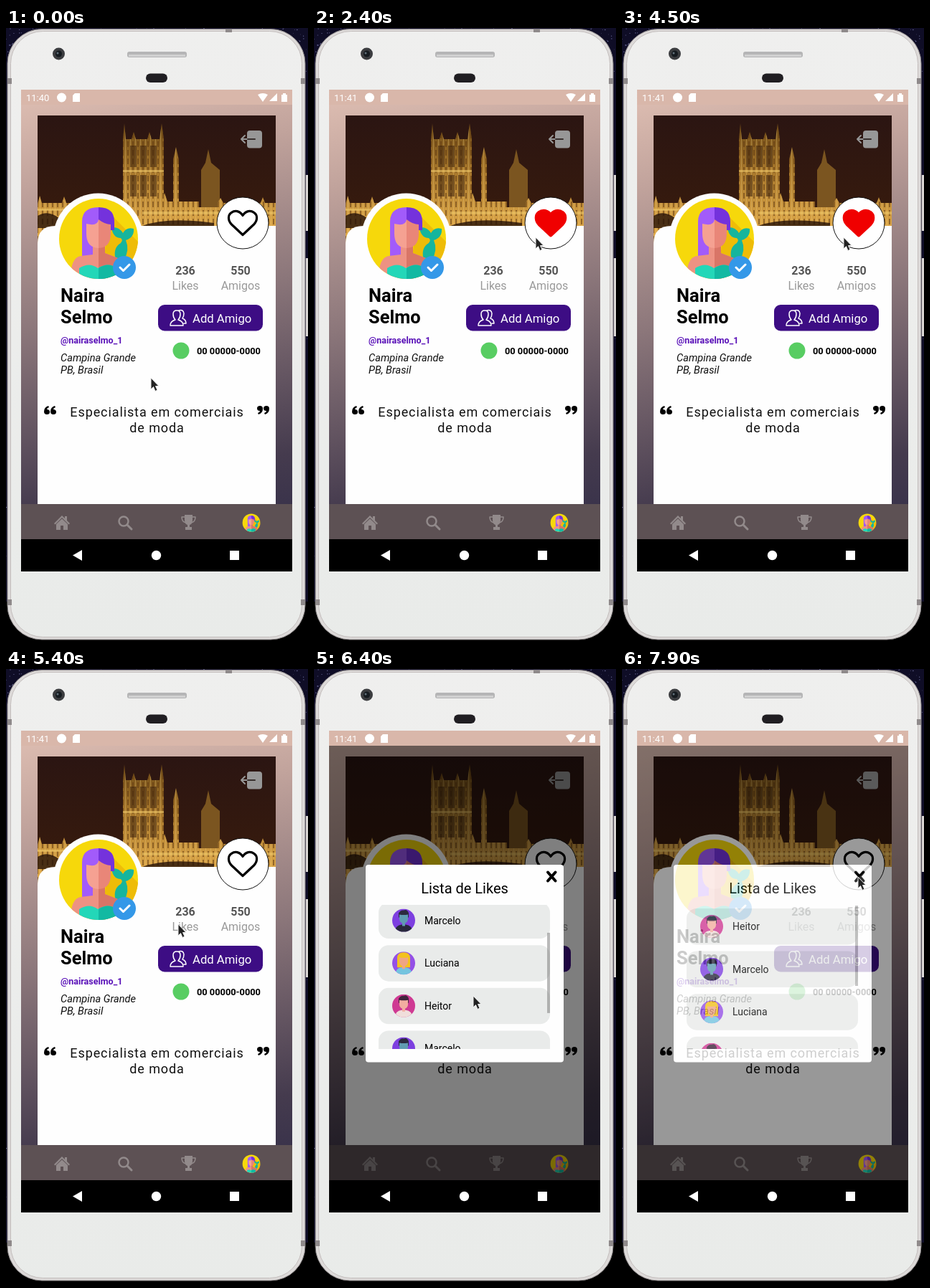
These frames come from a looping animation (421 by 855 pixels, 8 s). An HTML page:

```html
<!DOCTYPE html>
<html lang="pt">
<head>
<meta charset="utf-8">
<title>Perfil</title>
<style>
  html, body { margin: 0; width: 100%; height: 100%; overflow: hidden; background: #0c0a1a; }
  svg { display: block; font-family: Roboto, sans-serif; }
  .mid { text-anchor: middle; }
  .bold { font-weight: 700; }
  .icon { fill: #928a8b; }
  .line { fill: none; stroke-linecap: round; stroke-linejoin: round; }
</style>
</head>
<body>
<svg id="stage" width="100%" height="100%" viewBox="0 0 421 855">
  <defs>
    <linearGradient id="shell" x2="0" y2="1">
      <stop offset="0" stop-color="#efefee"/><stop offset="1" stop-color="#e9ebe9"/>
    </linearGradient>
    <linearGradient id="wall" x2=".12" y2="1">
      <stop offset="0" stop-color="#dfbfb3"/><stop offset=".2" stop-color="#c1a39c"/>
      <stop offset=".5" stop-color="#8b767a"/><stop offset=".86" stop-color="#453b4e"/>
      <stop offset="1" stop-color="#37314a"/>
    </linearGradient>
    <linearGradient id="sky" x2="0" y2="1">
      <stop offset="0" stop-color="#2b1512"/><stop offset="1" stop-color="#3a1c0c"/>
    </linearGradient>
    <linearGradient id="glow" gradientUnits="userSpaceOnUse" x1="0" y1="130" x2="0" y2="276">
      <stop offset="0" stop-color="#6b4816"/><stop offset=".45" stop-color="#a5752a"/><stop offset="1" stop-color="#dca648"/>
    </linearGradient>
    <pattern id="stone" width="7" height="12" patternUnits="userSpaceOnUse">
      <path fill="#5a350f" opacity=".55" d="M1 2h2v8H1z"/><path fill="#f0cf7d" opacity=".35" d="M5 0h1v12H5z"/>
    </pattern>
    <clipPath id="card"><path d="M44 122h332v542H44z"/></clipPath>
    <clipPath id="round"><ellipse cx="129" cy="294" rx="55" ry="56"/></clipPath>
    <clipPath id="disc"><circle cx="35" cy="25" r="16"/></clipPath>
    <path id="heart" d="M330 288.500L314.500 274C309 268.500 309.500 261 313.500 258C319 253.500 326 255 330 261.500C334 255 341 253.500 346.500 258C350.500 261 351 268.500 345.500 274Z"/>
    <path id="palace" d="M163 250V157l2-24 2 22h8l3-10 3 10h16l3-10 3 10h11l3-22 3 22v95zM233 262v-78l4-18 4 18v78zM44 246l3-12 3 10h28l3-9 3 9h32l3-9 3 9h41v6h54v-8l4-12 4 12h44v8h26v-6l4-7 4 7h22l3-8 3 8h24l3-8 3 8h22v57H44z"/>
    <g id="quote"><path d="M0 8Q0 2 6 0L7 2Q4 3 4 5Q8 5 8 8.500Q8 12 4 12Q0 12 0 8M9 8Q9 2 15 0L16 2Q13 3 13 5Q17 5 17 8.500Q17 12 13 12Q9 12 9 8"/></g>
    <g id="woman" clip-path="url(#round)">
      <path fill="#f6d80b" d="M70 235h120v120H70z"/>
      <path fill="#eebc08" d="M146 260L190 304v56h-60z"/>
      <path fill="#16b59d" d="M153 324Q149 309 157 302Q165 297 160 293Q149 293 147 278Q158 277 163 286Q168 277 178 280Q179 292 167 296Q173 310 164 324Z"/>
      <path fill="#a25bfa" d="M106 318V270Q106 250 129 250V318Z"/>
      <path fill="#7432dc" d="M129 250Q151 250 151 270V282H129Z"/>
      <path fill="#ed9283" d="M90 350Q90 320 104 318L121 316V298H138V314L151 319Q168 324 168 350Z"/>
      <path fill="#d97567" d="M129 298h9v16l13 5q17 5 17 31h-39z"/>
      <path fill="#f5a192" d="M112 273Q128 277 129 267V307Q112 306 112 287Z"/>
      <path fill="#e98678" d="M129 267Q138 274 146 274V287Q146 306 129 307Z"/>
      <path fill="#23d7b8" d="M102 350V335Q116 326 128 335Q142 326 155 335V352Z"/>
      <path fill="#12b9a2" d="M129 335q13-9 26 0v17h-26z"/>
    </g>
  </defs>

  <path fill="#0f0d26" d="M0 0h421v855H0z"/>
  <g id="stars"></g>
  <path fill="#000" d="M0 800h421v55H0z"/>

  <!-- phone -->
  <path fill="#d9d5d3" d="M418 205h3v78h-3zM418 321h3v109h-3z"/>
  <rect x="2" y="1.500" width="415" height="851.500" rx="48" fill="#dddad9" stroke="#8f8a8b"/>
  <rect x="6.500" y="4.500" width="406" height="845" rx="45" fill="url(#shell)" stroke="#c3bdbc"/>
  <path fill="#8f8a8b" d="M306 1h9v5h-9zM2 70h6v8H2zM411 70h6v8h-6zM2 797h6v8H2zM411 797h6v8h-6z"/>
  <circle cx="73.500" cy="36" r="8.500" fill="#3c3d40"/><circle cx="73.500" cy="36" r="4.500" fill="#161b20"/>
  <circle cx="72" cy="35" r="1.500" fill="#617079"/>
  <rect x="169" y="33" width="83" height="8" rx="3" fill="#b5b5b6"/>
  <path fill="#d1d1d1" d="M171 37h79v3h-79z"/>
  <rect x="195" y="63.500" width="30" height="12.500" rx="6.250" fill="#201e22"/>

  <!-- screen -->
  <path fill="url(#wall)" d="M21 86h378v672H21z"/>
  <path fill="#d9b7aa" d="M21 86h378v21H21z"/>
  <g fill="#fff">
    <text id="clock" x="28" y="102" font-size="13">11:40</text>
    <circle cx="77.500" cy="97" r="6.500"/>
    <path d="M96 91h7v12H93V94zM351 93Q358 89 365 93L358 103ZM378 91V102H367ZM386 91h4v2h2v10h-8V93h2z"/>
  </g>

  <g clip-path="url(#card)">
    <path fill="url(#sky)" d="M44 122h332v180H44z"/>
    <path fill="#7b5520" d="M272 270v-72l6-10 4-19 4 19 12 10v72z"/>
    <use href="#palace" fill="url(#glow)"/>
    <use href="#palace" fill="url(#stone)"/>
    <path fill="#3d220c" opacity=".55" d="M173 164h9v30h-9zM187 164h9v30h-9zM201 164h9v30h-9zM173 205h9v30h-9zM187 205h9v30h-9zM201 205h9v30h-9z"/>
    <path fill="#f0c868" opacity=".6" d="M190 256h186v4H190zM163 198h57v3h-57zM44 252h40v3H44z"/>
    <path fill="#251107" opacity=".8" d="M44 262q14-9 30 3l20 14H44zM190 276q35-13 100-4v4z"/>
    <path fill="#fefefe" d="M44 664V301Q44 276 69 276H376V664Z"/>
  </g>

  <path fill="#979797" d="M340 143h13q4 0 4 4v16.500q0 4-4 4h-13q-4 0-4-4v-16.500q0-4 4-4z"/>
  <path class="line" stroke="#979797" stroke-width="2" d="M336 155h-8m5-5l-5 5 5 5"/>
  <path class="line" stroke="#38302e" stroke-width="2" d="M337 155h10"/>

  <circle cx="128.500" cy="293" r="62.500" fill="#fefefe"/>
  <use href="#woman"/>
  <circle cx="165" cy="334" r="16" fill="#3498e8"/>
  <path class="line" stroke="#fff" stroke-width="3" d="M159 334l4.500 4.500 8.500-8.500"/>
  <circle cx="330" cy="272" r="36" fill="#fff" stroke="#111"/>
  <use href="#heart" fill="none" stroke="#000" stroke-width="3.200" stroke-linejoin="round"/>
  <use id="love" href="#heart" fill="#f00000" stroke="#f00000" stroke-width="5.500" stroke-linejoin="round"/>

  <g class="bold" font-size="25.500"><text x="76" y="382">Naira</text><text x="76" y="412">Selmo</text></g>
  <text class="bold" x="76" y="440" font-size="12.500" fill="#5a12b8">@nairaselmo_1</text>
  <g font-size="14.600" font-style="italic" fill="#111"><text x="76" y="465">Campina Grande</text><text x="76" y="482">PB, Brasil</text></g>
  <g class="mid" font-size="16">
    <g class="bold" fill="#555"><text x="250" y="344">236</text><text x="327" y="344">550</text></g>
    <g fill="#999"><text x="250" y="365">Likes</text><text x="327" y="365">Amigos</text></g>
  </g>
  <rect x="212" y="386" width="146" height="36.500" rx="9" fill="#3d0d84"/>
  <g class="line" stroke="#fff" stroke-width="1.500">
    <path d="M229 415q0-6 7-8-3-3-3-8 0-5 5-5t5 5q0 5-3 8 7 2 7 8zM241 394q6-2 7 4 0 4-2 7 5 2 5 7h-3"/>
  </g>
  <text x="260" y="411" font-size="16.700" fill="#fff">Add Amigo</text>
  <circle cx="244" cy="450" r="11.500" fill="#58cd62"/>
  <text class="bold" x="266" y="455" font-size="12.800">00 00000-0000</text>
  <use href="#quote" x="53" y="527"/>
  <use href="#quote" transform="translate(367 539) rotate(180)"/>
  <g class="mid" font-size="18" letter-spacing=".9" fill="#111"><text x="210.500" y="542">Especialista em comerciais</text><text x="210.500" y="564">de moda</text></g>

  <!-- tabs and system keys -->
  <path fill="#5d5154" d="M21 664h378v49H21z"/>
  <path class="icon" d="M67 691l11-11 4 4v-3h3v6l4 4-1.500 1.500L78 683l-9.500 9.500zM70 692l8-7.500 8 7.500v8h-6v-6h-4v6h-6zM249 679h11v7q0 6-4 7v3h3v4h-9v-4h3v-3q-4-1-4-7z"/>
  <g class="line" stroke="#928a8b">
    <circle cx="164" cy="688" r="6.500" stroke-width="2.500"/><path stroke-width="3" d="M169 693l6 6"/>
    <path stroke-width="1.500" d="M250 682h-5q0 7 6 8M259 682h5q0 7-6 8"/>
  </g>
  <use href="#woman" transform="translate(342 690) scale(.225) translate(-129 -294)"/>
  <path fill="#000" d="M21 713h378v45H21z"/>
  <path fill="#fff" d="M106 728v15l-13-7.500zM312 729h13v13h-13z"/><circle cx="209.500" cy="735.500" r="6.700" fill="#fff"/>

  <!-- likes dialog -->
  <g id="modal">
    <path opacity=".5" d="M21 107h378v606H21z"/>
    <rect x="72" y="273" width="276" height="275.500" rx="4" fill="#fefefe"/>
    <text class="mid" x="210" y="313" font-size="20">Lista de Likes</text>
    <path class="line" stroke="#000" stroke-width="4" d="M326 283.500l10.500 12m0-12l-10.500 12"/>
    <svg x="90" y="329" width="239" height="201">
      <g id="rows"></g>
      <rect id="thumb" x="235" width="4" height="112" fill="#777" opacity=".5"/>
    </svg>
  </g>

  <path id="cursor" fill="#222" stroke="#eee" stroke-width="1" stroke-linejoin="round" d="M0 0V16L3.500 12.500L6 18.500L9 17L6.500 11.500H11Z"/>
</svg>

<script>
const $ = id => document.getElementById(id);

// name, backdrop, hair, skin, clothes
const people = [
  ['Heitor', '#cf3a93', '#40243c', '#f2ada0', '#f0dedb'],
  ['Marcelo', '#7d3fe0', '#2c2a40', '#609bb2', '#29293d'],
  ['Luciana', '#9450e6', '#f4c21d', '#efa584', '#74c4df']
];

function row(i) {
  const [name, back, hair, skin, wear] = people[i % 3];
  const locks = name === 'Luciana' ? 'M26 31V18q0-8 9-8t9 8v13z' : 'M28 21v-6q3-5 7-4 5-2 7 4v6z';
  return `<g transform="translate(0 ${5 + 59.6 * i})">
    <rect width="239" height="50.500" rx="14" fill="#e9ebea"/>
    <g clip-path="url(#disc)">
      <path fill="${back}" d="M19 9h32v32H19z"/>
      <path fill="${hair}" d="${locks}"/>
      <path fill="${wear}" d="M23 42q0-10 9-11h6q9 1 9 11z"/>
      <path fill="${skin}" d="M29 17q6 1 12 0v6q0 4-4 6v4h-4v-4q-4-2-4-6z"/>
    </g>
    <text x="64" y="30" font-size="14">${name}</text></g>`;
}
$('rows').innerHTML = [0, 1, 2, 3, 4, 5].map(row).join('');

let seed = 7;
const rnd = () => (seed = seed * 16807 % 2147483647) / 2147483647;
let sky = '';
for (let i = 0; i < 420; i++) {
  sky += `<circle cx="${rnd() * 421}" cy="${rnd() * (i % 2 ? 25 : 800)}" r="${.3 + rnd() * .5}" fill="#7778a8"/>`;
}
$('stars').innerHTML = sky;

// Each key is [time, ...values]; values are linear between keys.
const pointer = [
  [400, 202, 488], [600, 178, 430], [800, 239, 343], [900, 239, 343], [1200, 320, 296],
  [1300, 309, 292], [4900, 309, 292], [5100, 284, 312], [5300, 234, 352], [5400, 240, 356],
  [5600, 240, 356], [5700, 245, 373], [6000, 245, 373], [6200, 228, 500], [6400, 222, 456],
  [6600, 222, 370], [6700, 224, 372], [7000, 242, 502], [7100, 252, 485], [7400, 326, 309],
  [7500, 326, 309], [7600, 329, 290]
];
const liking = [[1400, 0], [2300, 1], [3200, 0], [3300, 0], [4200, 1], [5100, 0]];
const scrolling = [[6000, 0], [6200, 10], [6400, 68], [6600, 160], [6700, 160], [7000, 57], [7200, 0]];
const fading = [[5600, 0], [5700, .45], [5800, .85], [5900, 1], [7800, 1], [7900, .8]];

function at(keys, t) {
  const n = keys.findIndex(k => k[0] > t);
  if (n <= 0) return keys[n ? keys.length - 1 : 0].slice(1);
  const a = keys[n - 1], b = keys[n], p = (t - a[0]) / (b[0] - a[0]);
  return a.slice(1).map((v, i) => v + (b[i + 1] - v) * p);
}

function draw(now) {
  const t = Math.floor(now % 8000 / 100) * 100; // the screen updates ten times a second
  const [x, y] = at(pointer, t), [like] = at(liking, t), [scroll] = at(scrolling, t);
  const size = 1 - (1 - Math.min(1, like / .6)) ** 2;
  $('cursor').setAttribute('transform', `translate(${x} ${y})`);
  $('love').setAttribute('transform', `translate(330 272) scale(${size}) translate(-330 -272)`);
  $('love').setAttribute('visibility', size ? 'visible' : 'hidden');
  $('rows').setAttribute('transform', `translate(0 ${-scroll})`);
  $('thumb').setAttribute('y', 1 + scroll * .557);
  $('modal').setAttribute('opacity', at(fading, t)[0]);
  $('clock').textContent = t < 1500 ? '11:40' : '11:41';
}

const start = performance.now();
(function loop() {
  draw(performance.now() - start);
  requestAnimationFrame(loop);
})();
</script>
</body>
</html>
```
